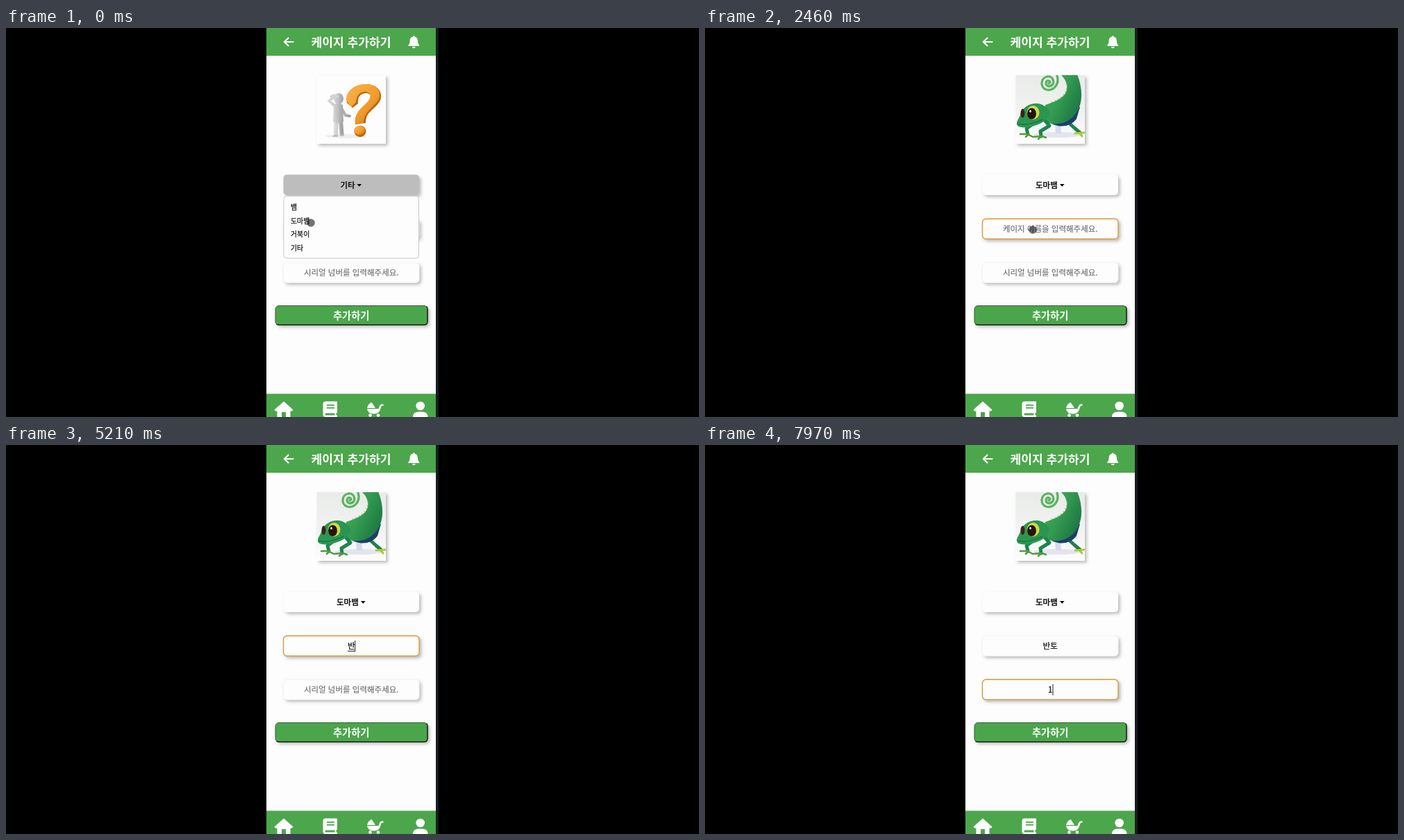
An HTML page that plays this animation: 998 px wide and 561 px high, repeating every 8 s.

```html
<!DOCTYPE html>
<html lang="ko">
<head>
<meta charset="utf-8">
<style>
  html, body { margin: 0; width: 100%; height: 100%; overflow: hidden; background: #000; }
  svg { display: block; width: 998px; height: 561px; }
  text { font-family: "Noto Sans CJK KR", "Noto Sans CJK", "Noto Sans", sans-serif; font-size: 11.5px; }
  .mid { text-anchor: middle; }
  .medium { font-weight: 500; fill: #151515; stroke: #151515; stroke-width: .25px; }
  .hint { fill: #6c6c6c; stroke: #6c6c6c; stroke-width: .15px; }
  .label { font-weight: 700; fill: #151515; }
  .field { fill: #fdfdfd; filter: url(#drop); }
  .white { fill: #fff; }
  .line { fill: none; stroke: #fff; stroke-width: 2.2; stroke-linecap: round; stroke-linejoin: round; }
  .limb { fill: none; stroke-linecap: round; stroke-linejoin: round; }
</style>
</head>
<body>
<svg viewBox="0 0 998 561">
  <defs>
    <filter id="drop" x="-15%" y="-40%" width="130%" height="190%">
      <feDropShadow dx="2.8" dy="2.8" stdDeviation="2.3" flood-color="#555" flood-opacity=".38"/>
    </filter>
    <linearGradient id="backdrop" x2="0" y2="1">
      <stop stop-color="#e9ebe9"/><stop offset=".6" stop-color="#f2f3f2"/><stop offset="1" stop-color="#fdfdfd"/>
    </linearGradient>
    <linearGradient id="skin" x2="1" y2=".6">
      <stop stop-color="#4db35f"/><stop offset=".55" stop-color="#349b50"/><stop offset="1" stop-color="#1d7844"/>
    </linearGradient>
    <linearGradient id="orange" x2="1" y2="1">
      <stop stop-color="#f9b54a"/><stop offset=".6" stop-color="#f09b2a"/><stop offset="1" stop-color="#c96f12"/>
    </linearGradient>
    <linearGradient id="clay" x2="1"><stop stop-color="#d9d9d9"/><stop offset="1" stop-color="#a2a2a2"/></linearGradient>
    <clipPath id="card"><rect x="447.5" y="68" width="99.5" height="99"/></clipPath>
    <clipPath id="app"><rect x="375" width="244" height="561"/></clipPath>
  </defs>

  <rect x="619" width="4" height="561" fill="#171c21"/>
  <rect x="375" width="244" height="561" fill="#fdfdfd"/>

  <!-- header -->
  <rect x="375" width="244" height="40" fill="#4ca64b"/>
  <path class="line" d="M413.500 20H401M406.500 14.500L400.800 20L406.500 25.500"/>
  <text class="mid white" x="497" y="27" style="font-size:17.150px;font-weight:700">케이지 추가하기</text>
  <path class="white" d="M586 12.500V11.500H588.500V12.500C592 13.300 593 16 593 19C593 22 594 23.500 595.300 25V26H579.300V25C580.600 23.500 581.600 22 581.600 19C581.600 16 582.500 13.300 586 12.500ZM585 27H589.600A2.300 2.300 0 0 1 585 27Z"/>

  <!-- picture -->
  <rect class="field" x="447.500" y="68" width="99.500" height="99"/>
  <g id="unknown" clip-path="url(#card)">
    <ellipse cx="490" cy="156" rx="30" ry="3" fill="#eee"/>
    <g class="limb" stroke="url(#clay)">
      <path stroke-width="4" d="M473 112L465 105L473 99M484 117L489 126L495 127"/>
      <path stroke-width="6" d="M475.500 133L475 154M482 133L483.500 153"/>
    </g>
    <path fill="url(#clay)" d="M472 110Q479 106 485 111L486 135Q478 139 471 135Z"/>
    <ellipse cx="479" cy="102" rx="7" ry="8" fill="url(#clay)"/>
    <path d="M468 99Q473 95 478 99" class="limb" stroke="#d5d5d5" stroke-width="3.500"/>
    <path fill="#bdbdbd" d="M470 157Q472 152 478 154V157ZM480 156Q483 151 488 156Z"/>
    <path fill="#b9650f" d="M491 108C488 91 504 80 521 81C539 83 545 98 536 109C528 119 518 122 518 137L503 139C501 121 514 115 522 107C529 100 525 93 517 94C510 95 506 100 507 109L499 115Z"/>
    <path fill="url(#orange)" d="M490 104C489 90 504 80 520 81C537 82 542 96 535 106C527 116 516 121 515 137L503 138C502 120 514 114 521 106C528 98 524 91 516 92C508 93 505 98 504 107L497 114Z"/>
    <ellipse cx="510" cy="149" rx="8.500" ry="8.300" fill="#bd6a12"/>
    <ellipse cx="509" cy="147.500" rx="7.800" ry="6.500" fill="url(#orange)"/>
  </g>
  <g id="gecko" clip-path="url(#card)">
    <rect x="447" y="68" width="100" height="99" fill="url(#backdrop)"/>
    <ellipse cx="508" cy="154" rx="35" ry="4" fill="#e3e5ee"/>
    <path d="M504 138H512L513 152H505Z" fill="#d7daeb"/>
    <path class="limb" stroke="#5bb360" stroke-width="3.300" d="M507 69C511 81 502 91 492 89C482 86 483 72 493 70C503 69 505 83 496 84C489 84 490 75 495 76Q499 78 495 80"/>
    <path class="limb" stroke="#23804a" stroke-width="5" d="M523 136L533 145L540 151"/>
    <path class="limb" stroke="#a8c83a" stroke-width="3" d="M533 152L546 151M540 152L543 156"/>
    <path fill="#1c3f68" d="M490 131C502 144 524 146 535 131L540 114L500 112Z"/>
    <path fill="url(#skin)" d="M512 67C521 75 525 88 517 97C510 104 501 107 490 111L484 133C497 140 515 141 528 130C544 117 546 91 536 67Z"/>
    <path class="limb" stroke="#8bcb72" stroke-width="1.500" stroke-dasharray="1 4" d="M521 82C522 97 509 104 496 108"/>
    <path class="limb" stroke="#1f8450" stroke-width="5" d="M473 138L463 145L465 153M490 134L496 141L483 149L484 156"/>
    <path class="limb" stroke="#4d9b3d" stroke-width="2.500" d="M454 153L466 153L462 157M466 154L472 157M473 157L485 156L480 160M485 156L491 158"/>
    <path fill="#2b9652" d="M449 138C449 133 453 130 455 122C460 111 474 106 484 110C494 114 500 122 494 129C486 140 464 145 455 143Q449 142 449 138Z"/>
    <path class="limb" stroke="#176c41" stroke-width="1.200" d="M450 138Q464 142 486 132"/>
    <ellipse cx="457.500" cy="123" rx="3" ry="6.500" fill="#3a2518"/>
    <ellipse cx="472.500" cy="122" rx="9" ry="10" fill="#d5d947"/>
    <ellipse cx="470.500" cy="123.500" rx="6.500" ry="8" fill="#26140f"/>
    <ellipse cx="468.500" cy="120" rx="1.300" ry="1.700" fill="#fff"/>
  </g>

  <!-- form -->
  <rect id="select" class="field" x="399.500" y="211.500" width="195.500" height="29.500" rx="5"/>
  <text id="species" class="label" y="230.800"></text>
  <path id="arrow" d="M0 225H6.600L3.300 228.700Z"/>
  <rect id="nameBox" class="field" x="399.500" y="275.300" width="195.500" height="29" rx="5"/>
  <text id="name" class="mid" x="497.200" y="294.300"></text>
  <rect id="serialBox" class="field" x="399.500" y="338.300" width="195.500" height="29" rx="5"/>
  <text id="serial" class="mid" x="497.200" y="357.300"></text>
  <path id="underline" stroke="#111"/>
  <path id="caret" stroke="#222"/>

  <rect x="388" y="400.500" width="219" height="27.700" rx="5" fill="#4ca64b" stroke="#3f5c3f" filter="url(#drop)"/>
  <path d="M389.500 427.300Q390.500 428.200 393 428.200H602Q607 428.200 607 423.200V405.500Q607 402.500 605.500 401.500" fill="none" stroke="#101c10" stroke-width="1.300"/>
  <text class="mid white" x="497.200" y="419.700" style="font-size:14.300px;font-weight:700">추가하기</text>

  <g id="menu">
    <rect x="400" y="242.500" width="194.500" height="89.500" rx="4" fill="#fdfdfd" stroke="#c9c9c9"/>
    <g id="options"></g>
  </g>

  <!-- bottom navigation -->
  <rect x="375" y="527.500" width="244" height="34" fill="#4ca64b"/>
  <path class="white" d="M400 538.500L413.500 550.500L412 552.500H409.500V561H403V554H397V561H390.500V552.500H388L386.500 550.500Z"/>
  <path class="white" fill-rule="evenodd" d="M460 538.500H477V555H475.500V558.500H477V561H460Q456.500 561 456.500 557V542Q456.500 538.500 460 538.500ZM462 543V544.800H473V543ZM462 547V548.800H473V547ZM460.500 555.500Q458.500 557 460.500 558.500H473.500V555.500Z"/>
  <path class="white" d="M520 548A12 12 0 0 1 526.500 539.800L532 548ZM520 549.300H536.500L538 545Q539 542.500 541 542.500H543.500V544.800H541L539 550Q537 556.500 530 556.500Q521 556.500 520 549.300Z"/>
  <circle class="white" cx="524.500" cy="558.500" r="2.300"/><circle class="white" cx="536" cy="558.500" r="2.300"/>
  <circle class="white" cx="596.700" cy="545" r="6.300"/>
  <path class="white" d="M586 561Q586 553.500 594 553.500H599.500Q607.500 553.500 607.500 561Z"/>

  <g clip-path="url(#app)"><circle id="pointer" r="5.800"/></g>
</svg>

<script>
const LOOP = 8000;
const MENU_CLOSE = 200, NAME_FOCUS = 1700, SERIAL_FOCUS = 6750;
const ui = Object.fromEntries([...document.querySelectorAll('[id]')].map(el => [el.id, el]));

ui.options.innerHTML = ['뱀', '도마뱀', '거북이', '기타'].map((label, i) =>
  `<text class="medium" x="410" y="${262 + i * 19.7}" style="font-size:9.900px">${label}</text>`).join('');

// [time, text]
const nameTyping = [[4800, 'ㅂ'], [4950, '바'], [5100, '반'], [5450, '반ㅌ'], [5600, '반토']];
const serialTyping = [[7700, '1']];

// [time, x, y]
const pointerPath = [
  [0, 439, 281], [250, 438, 281], [630, 431, 279], [1000, 434, 281], [1500, 472, 291],
  [2700, 472, 291], [3200, 366, 330], [5850, 366, 408], [6130, 410, 394], [6550, 472, 353],
  [7000, 472, 353], [7400, 366, 380], [LOOP, 366, 380]
];
const presses = [[0, 150], [1620, 1720], [2380, 2560], [6650, 6750]];

const show = (el, on) => el.style.display = on ? '' : 'none';
const lastBefore = (steps, t) => steps.filter(step => step[0] <= t).pop();

function pointerAt(t) {
  const i = pointerPath.findIndex(p => p[0] > t);
  const [t0, x0, y0] = pointerPath[i - 1], [t1, x1, y1] = pointerPath[i];
  const k = (t - t0) / (t1 - t0), ease = k * k * (3 - 2 * k);
  return [x0 + (x1 - x0) * ease, y0 + (y1 - y0) * ease];
}

function drawField(text, box, value, hint, focused) {
  text.textContent = value || hint;
  text.setAttribute('class', 'mid ' + (value ? 'medium' : 'hint'));
  box.style.stroke = focused ? '#dd9836' : '#f0f0f0';
  box.style.strokeWidth = focused ? 1.4 : 0.6;
}

function draw(t) {
  const open = t < MENU_CLOSE;
  show(ui.menu, open);
  show(ui.unknown, open);
  show(ui.gecko, !open);
  ui.species.textContent = open ? '기타' : '도마뱀';
  ui.species.setAttribute('x', open ? 481.5 : 476);
  ui.arrow.setAttribute('transform', `translate(${open ? 505.5 : 511})`);
  const shade = 189 + 64 * Math.min(1, Math.max(0, (t - MENU_CLOSE) / 150));
  ui.select.style.fill = `rgb(${shade},${shade},${shade})`;

  const onSerial = t >= SERIAL_FOCUS, onName = t >= NAME_FOCUS && !onSerial;
  const nameStep = lastBefore(nameTyping, t), serialStep = lastBefore(serialTyping, t);
  const name = nameStep ? nameStep[1] : '', serial = serialStep ? serialStep[1] : '';
  drawField(ui.name, ui.nameBox, name, '케이지 이름을 입력해주세요.', onName);
  drawField(ui.serial, ui.serialBox, serial, '시리얼 넘버를 입력해주세요.', onSerial);

  const value = onSerial ? serial : name;
  const half = value ? (onSerial ? 3.6 : value.length * 5.3) : 0;
  const right = 497.4 + half, top = onSerial ? 345 : 282;
  const step = onSerial ? serialStep : nameStep;
  const blinkStart = step ? step[0] : onSerial ? SERIAL_FOCUS : NAME_FOCUS;
  show(ui.caret, (onName || onSerial) && (t - blinkStart) % 1000 < 500);
  ui.caret.setAttribute('d', `M${right} ${top}v16`);
  show(ui.underline, onName && name);
  ui.underline.setAttribute('d', `M${right - 10.6} 297.200H${right}`);

  const [x, y] = pointerAt(t);
  ui.pointer.setAttribute('transform', `translate(${x} ${y})`);
  const pressed = presses.some(([from, to]) => t >= from && t < to);
  ui.pointer.style.fill = `rgba(0,0,0,${pressed ? 0.55 : 0.45})`;
}

const start = performance.now();
function tick() {
  draw((performance.now() - start) % LOOP);
  requestAnimationFrame(tick);
}
tick();
</script>
</body>
</html>
```
